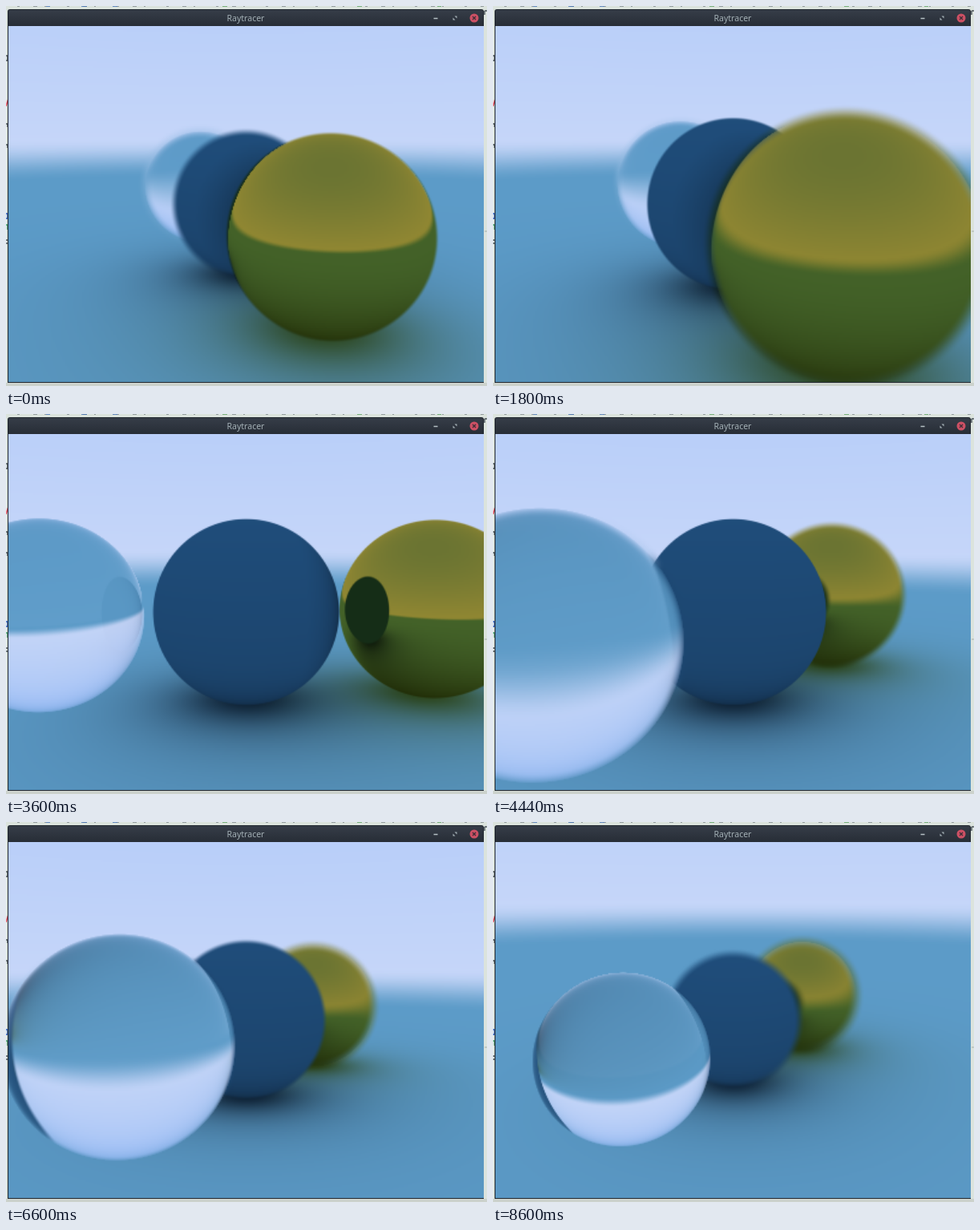
Write an HTML page with a canvas that moves like this. It is 600 by 474 pixels and loops after 8720 ms.

```html
<!DOCTYPE html>
<html lang="en">
<head>
<meta charset="utf-8">
<title>Raytracer</title>
<style>
  html, body { margin: 0; width: 100%; height: 100%; overflow: hidden; background: #dbe3dd; }
  svg { position: absolute; left: 0; top: 0; }
  canvas { position: absolute; left: 3px; top: 25px; width: 593px; height: 444px; }
</style>
</head>
<body>
<svg width="600" height="474" viewBox="0 0 600 474">
  <defs>
    <linearGradient id="bar" x2="0" y2="1">
      <stop offset="0" stop-color="#363d48"/>
      <stop offset="1" stop-color="#272d36"/>
    </linearGradient>
  </defs>
  <rect width="600" height="474" fill="#dbe3dd"/>
  <rect y="470" width="600" height="4" fill="#ccd2cc"/>
  <g fill="none" stroke-width="1.5">
    <path stroke="#7d878c" stroke-dasharray="3 17 5 9 2 26" d="M14 0H596"/>
    <path stroke="#3f6fb5" d="M50 0h5M94 0h7M133 0h6"/>
    <path stroke="#57a05c" d="M270 0h6M438 0h6M538 0h5"/>
    <path stroke="#4c555c" d="M0 62h2v6h-2M0 147h2v4M0 173h2v4M0 292h3M0 296h3M597 6v5M597 6h3"/>
    <path stroke="#d8485a" d="M0 125l2.500-8"/>
    <path stroke="#2f5fc0" d="M0 259h2v6h-2"/>
    <path stroke="#3f9a6a" d="M0 273h2v6"/>
    <path stroke="#b9c1bd" d="M597 281h3"/>
  </g>
  <path fill="#20262e" d="M2 470V7q0-3 3-3H593q3 0 3 3V470z"/>
  <path fill="url(#bar)" d="M3 25V7q0-2 2-2H593q2 0 2 2V25z"/>
  <text x="299" y="18.500" text-anchor="middle" font-family="'Noto Sans', sans-serif" font-size="10.500" fill="#a3b0b5">Raytracer</text>
  <path stroke="#b5c0c4" stroke-width="1.500" d="M533.500 15.500h5"/>
  <path fill="#a3b0b5" d="M559.500 12.500h3v3zM557.500 14.500v3h3z"/>
  <circle cx="584" cy="15" r="5.500" fill="#cc5064"/>
  <path stroke="#3a2c36" stroke-width="1.200" d="M582 13l4 4M586 13l-4 4"/>
</svg>
<canvas id="view" width="396" height="296"></canvas>
<script>
const LOOP = 8720;
// Bursts of redraws: first time, last time, count.
const BURSTS = [
  [120, 880, 10], [1000, 1800, 9], [1880, 2680, 10], [2760, 3240, 6], [3400, 3600, 3],
  [3760, 3760, 1], [3920, 4440, 6], [4600, 4840, 3], [5000, 5400, 6], [5560, 5680, 2],
  [5840, 6240, 5], [6400, 6440, 2], [6600, 7360, 9], [7480, 8280, 9], [8400, 8600, 4]
];
// Camera keys: time, distance, pitch (rad), azimuth (deg).
const KEYS = [
  [0, 3.26, .161, 67.3], [1800, 2.756, .162, 67], [2720, 2.55, .159, 67],
  [2840, 2.55, .159, 66], [3240, 2.55, .157, 37], [3600, 2.55, .155, -6],
  [4440, 2.55, .148, -49], [4840, 2.55, .148, -58], [5000, 2.55, .148, -58],
  [5720, 2.55, .131, -58.5], [6600, 3, .131, -58.5], [7360, 3.19, .27, -55],
  [8600, 3.53, .27, -53]
];
const FOCAL = 580, FOCUS = 2.54, APERTURE = .21, DIP = .062, IOR = 1.5, R = .5, GAP = 1.05;
const METAL = [.73, .63, .2];
const BLUE = 0, GREEN = GAP, GLASS = -GAP; // each ball's x position

const canvas = document.getElementById('view');
const ctx = canvas.getContext('2d');
const image = ctx.createImageData(canvas.width, canvas.height);

const smooth = v => v <= 0 ? 0 : v >= 1 ? 1 : v * v * (3 - 2 * v);
const mix = (a, b, k) => [a[0] + (b[0] - a[0]) * k, a[1] + (b[1] - a[1]) * k, a[2] + (b[2] - a[2]) * k];
const blurAt = depth => Math.max(1.8, APERTURE * FOCAL * Math.abs(1 / depth - 1 / FOCUS));

function occlusion(x, z) {
  const q = x * x + z * z + R * R;
  return .125 / (q * Math.sqrt(q));
}

function groundColor(x, z) {
  const b = occlusion(x - BLUE, z), g = occlusion(x - GREEN, z);
  const k = Math.max(0, 1 - .95 * b - .9 * g);
  return [92 * k + 12 * b + 40 * g, 155 * k + 30 * b + 62 * g, 200 * k + 52 * b + 18 * g];
}

// Diffuse blue, darkened towards the ground and the green ball.
function blueColor(nx, ny) {
  const low = Math.max(0, -ny);
  const near = Math.max(0, GAP * nx - R) * R * R / (GAP * GAP + R * R - GAP * nx) ** 1.5;
  const k = (.96 + .08 * ny - .4 * low ** 4) * (1 - .7 * near);
  return [30 * k, 74 * k, 118 * k];
}

function backdrop(ox, oy, oz, dx, dy, dz, soft) {
  const k = smooth((dy + DIP) / soft / 2 + .5);
  const sky = [196 - 50 * dy, 213 - 29 * dy, 249];
  if (k === 1) return sky;
  const s = (-R - oy) / Math.min(dy, -.002);
  return mix(groundColor(ox + dx * s, oz + dz * s), sky, k);
}

// Backdrop plus the opaque balls that a bounced ray can meet.
function bounce(self, ox, oy, oz, dx, dy, dz, soft) {
  let color = backdrop(ox, oy, oz, dx, dy, dz, soft);
  for (const ball of [GREEN, BLUE]) {
    if (ball === self) continue;
    const vx = ball - ox, along = vx * dx - oy * dy - oz * dz;
    if (along <= 0) continue;
    const miss = Math.sqrt(Math.max(0, vx * vx + oy * oy + oz * oz - along * along));
    const cover = smooth((R - miss) / soft + .5);
    if (cover > 0) color = mix(color, ball === BLUE ? blueColor(0, 0) : [72, 92, 38], cover);
  }
  return color;
}

function shade(ball, px, py, pz, dx, dy, dz, soft) {
  let nx = px - ball, ny = py, nz = pz;
  const len = Math.hypot(nx, ny, nz);
  nx /= len; ny /= len; nz /= len;
  if (ball === BLUE) return blueColor(nx, ny);
  const cos = Math.max(0, -(dx * nx + dy * ny + dz * nz));
  const mirror = bounce(ball, px, py, pz, dx + 2 * cos * nx, dy + 2 * cos * ny, dz + 2 * cos * nz, soft);
  if (ball === GREEN) return mirror.map((v, i) => v * METAL[i]);
  // Refract into the glass and out again.
  const inner = Math.sqrt(1 - (1 - cos * cos) / (IOR * IOR));
  const m = cos / IOR - inner;
  const tx = dx / IOR + m * nx, ty = dy / IOR + m * ny, tz = dz / IOR + m * nz;
  const path = 2 * R * inner;
  const qx = px + tx * path, qy = py + ty * path, qz = pz + tz * path;
  const e = (cos - IOR * inner) / R;
  const through = bounce(ball, qx, qy, qz,
    IOR * tx + e * (qx - ball), IOR * ty + e * qy, IOR * tz + e * qz, soft);
  return mix(through, mirror, .04 + .96 * (1 - cos) ** 5);
}

function render(dist, pitch, azimuth) {
  const sa = Math.sin(azimuth), ca = Math.cos(azimuth), sp = Math.sin(pitch), cp = Math.cos(pitch);
  const cx = dist * cp * sa, cy = dist * sp, cz = dist * cp * ca;
  const balls = [BLUE, GREEN, GLASS].map(ball => {
    const depth = dist - ball * sa * cp;
    const blur = blurAt(depth), scale = FOCAL / depth;
    return { ball, depth, edge: blur / scale, soft: blur / (scale * R) + .012 };
  }).sort((a, b) => b.depth - a.depth);
  const skySoft = APERTURE / FOCUS / 2;
  const { width, height, data } = image;
  let at = 0;
  for (let j = 0; j < height; j++) {
    const v = 222 - (j + .5) * 444 / height;
    for (let i = 0; i < width; i++) {
      const u = (i + .5) * 593 / width - 296.5;
      const inv = 1 / Math.sqrt(u * u + v * v + FOCAL * FOCAL);
      const flat = -FOCAL * cp - v * sp;
      const dx = (flat * sa + u * ca) * inv;
      const dy = (v * cp - FOCAL * sp) * inv;
      const dz = (flat * ca - u * sa) * inv;
      let color = backdrop(cx, cy, cz, dx, dy, dz, skySoft);
      for (const { ball, edge, soft } of balls) {
        const vx = ball - cx, along = vx * dx - cy * dy - cz * dz;
        const miss2 = vx * vx + cy * cy + cz * cz - along * along;
        const cover = smooth((R - Math.sqrt(Math.max(0, miss2))) / edge + .5);
        if (cover === 0) continue;
        const s = along - Math.sqrt(Math.max(0, R * R - miss2));
        color = mix(color, shade(ball, cx + dx * s, cy + dy * s, cz + dz * s, dx, dy, dz, soft), cover);
      }
      data[at++] = color[0];
      data[at++] = color[1];
      data[at++] = color[2];
      data[at++] = 255;
    }
  }
  ctx.putImageData(image, 0, 0);
}

function lastRedraw(t) {
  let shown = 0;
  for (const [from, to, count] of BURSTS) {
    for (let k = 0; k < count; k++) {
      const step = Math.round((from + (to - from) * k / Math.max(1, count - 1)) / 40) * 40;
      if (step <= t) shown = step;
    }
  }
  return shown;
}

function poseAt(t) {
  const n = KEYS.findIndex(key => key[0] > t);
  const a = KEYS[n < 0 ? KEYS.length - 1 : n - 1], b = n < 0 ? a : KEYS[n];
  const k = n < 0 ? 0 : (t - a[0]) / (b[0] - a[0]);
  return mix(a.slice(1), b.slice(1), k);
}

const start = performance.now();
let drawn = -1;
function tick() {
  const t = lastRedraw((performance.now() - start) % LOOP);
  if (t !== drawn) {
    drawn = t;
    const [dist, pitch, azimuth] = poseAt(t);
    render(dist, pitch, azimuth * Math.PI / 180);
  }
  requestAnimationFrame(tick);
}
tick();
</script>
</body>
</html>
```
